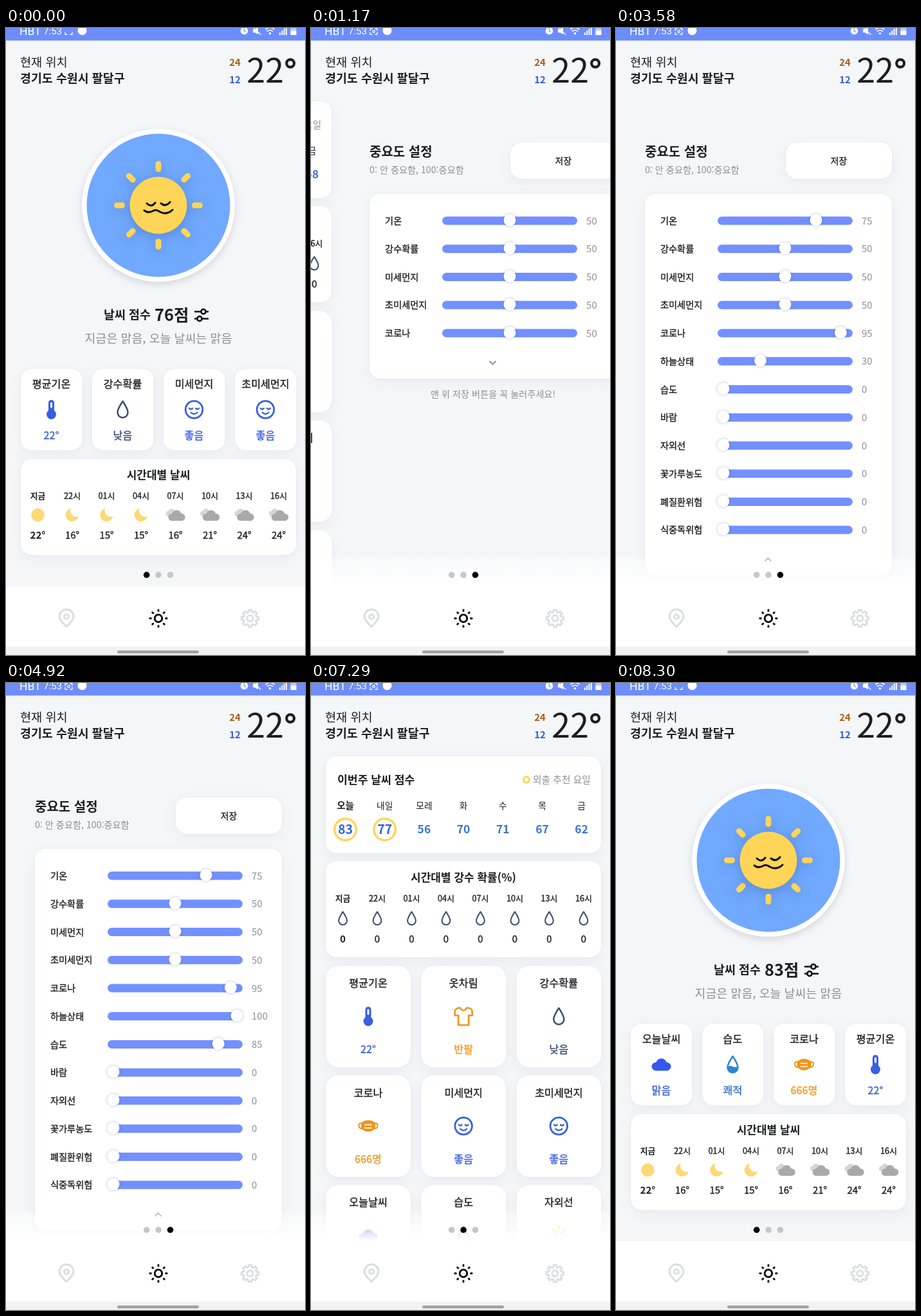
An HTML page that plays this animation: 465x976 px, repeating every 8.37 s.

```html
<!DOCTYPE html>
<html lang="ko">
<head>
<meta charset="utf-8">
<title>날씨</title>
<style>
html, body { margin: 0; width: 100%; height: 100%; overflow: hidden; background: #f5f6f8; }
svg { display: block; width: 465px; height: 976px; }
text { font-family: "Noto Sans CJK KR", "Noto Sans KR", "Noto Sans CJK JP", "Noto Sans CJK", sans-serif; color: #1d1e24; fill: currentColor; white-space: pre; }
.c { text-anchor: middle; }
.m { font-weight: 500; stroke: currentColor; stroke-width: .35px; }
.b { font-weight: 700; }
.status text { font-family: Roboto, sans-serif; color: #fff; }
.card { fill: #fff; filter: drop-shadow(0 0 1px rgba(60,75,130,.08)) drop-shadow(0 5px 9px rgba(60,75,130,.06)); }
.soft { filter: drop-shadow(0 4px 6px rgba(40,50,90,.16)); }
.glow { filter: drop-shadow(0 4px 9px rgba(30,60,130,.32)); }
.knob { fill: #fff; filter: drop-shadow(0 0 2px rgba(30,40,90,.3)); }
.line { fill: none; stroke-linecap: round; stroke-linejoin: round; }
</style>
</head>
<body>
<svg id="stage" viewBox="0 0 465 976" xmlns="http://www.w3.org/2000/svg"></svg>
<script>
const LOOP = 8370, EXPAND = 2500, SAVE = 6220;
const BLUE = '#385fe0', NAVY = '#3c4c6c', ORANGE = '#f0961c', GRAY = '#8e8f94',
      YELLOW = '#ffd557', BAR = '#7390ff', SCORE = '#3a74cc', PALE = '#dcdde0';

// Drawing helpers
const text = (x, y, size, str, cls = '', color = '') =>
  `<text x="${x}" y="${y}" font-size="${size}" class="${cls}"${color && ` style="color:${color}"`}>${str}</text>`;
const rect = (x, y, w, h, r, fill, more = '') =>
  `<rect x="${x}" y="${y}" width="${w}" height="${h}" rx="${r}" fill="${fill}" ${more}/>`;
const circle = (x, y, r, fill, more = '') => `<circle cx="${x}" cy="${y}" r="${r}" fill="${fill}" ${more}/>`;
const ring = (x, y, r, color, w) => circle(x, y, r, 'none', `stroke="${color}" stroke-width="${w}"`);
const line = (d, color, w) => `<path class="line" d="${d}" stroke="${color}" stroke-width="${w}"/>`;
const shape = (d, fill) => `<path d="${d}" fill="${fill}"/>`;
const card = (x, y, w, h, r = 17) => rect(x, y, w, h, r, '#fff', 'class="card"');
const at = (x, y, inner, scale = 1) => `<g transform="translate(${x} ${y}) scale(${scale})">${inner}</g>`;
const group = (id, inner) => `<g id="${id}">${inner}</g>`;
const each = (n, fn) => Array.from({ length: n }, (_, i) => fn(i)).join('');
const rays = (n, from, to, color, w) => each(n, i =>
  `<g transform="rotate(${i * 360 / n})">${line(`M0 ${-from}V${-to}`, color, w)}</g>`);

// Icons, centred on 0,0
const DROP = 'M0-13C4-7 8-1 8 4.4A8 8 0 0 1-8 4.4C-8-1-4-7 0-13Z';
const cloud = color => circle(-8.5, 3, 6.5, color) + circle(0, -1, 8.5, color) +
  circle(8.5, 3, 6.5, color) + rect(-8.5, 2, 17, 7.5, 0, color);
const icons = {
  thermo: rect(-4.5, -15, 9, 23, 4.5, BLUE) + circle(0, 7.5, 7.5, BLUE) + rect(-1.5, -11.5, 3, 9, 1.5, '#fff'),
  drop: line(DROP, NAVY, 2.5),
  humid: shape('M-7.5 3Q-4 1 0 3T7.5 3L8 5A8 8 0 0 1-8 5Z', '#2f84cf') + line(DROP, '#2f84cf', 2.5),
  smile: ring(0, 0, 13.3, BLUE, 2.8) + line('M-7.5-2Q-5 1-2.5-2M2.5-2Q5 1 7.5-2M-5 4.5Q0 9 5 4.5', BLUE, 2.3),
  shirt: line('M-5.5-13.5L-10-12.5Q-13.5-11-13.5-7V-1.5H-8V13.5H8V-1.5H13.5V-7Q13.5-11 10-12.5L5.5-13.5Q0-5-5.5-13.5Z', ORANGE, 2.7),
  mask: shape('M-11-5Q0-13 11-5V4Q0 14-11 4Z', ORANGE) +
    line('M-11-4C-17-5-15 3-11 4M11-4C17-5 15 3 11 4', ORANGE, 2) + line('M-5-2H5M-5 3H5', '#fff', 1.7),
  cloud: cloud('#3559ee'),
  uv: ring(0, 0, 6, YELLOW, 2.5) + rays(8, 10.5, 14, YELLOW, 2.5)
};
const sky = {
  sun: circle(0, 0, 10.3, '#fcd975'),
  moon: shape('M-2-10A10.2 10.2 0 1 0 10 2A9 9 0 0 1-2-10Z', '#fcd975'),
  cloud: at(-6, -4, cloud('#d6d6d6'), .6) + at(2, .8, cloud('#a9a9a9'), .88)
};

const items = {
  temp: ['평균기온', 'thermo', '22°', BLUE],
  rain: ['강수확률', 'drop', '낮음', NAVY],
  dust: ['미세먼지', 'smile', '좋음', BLUE],
  fine: ['초미세먼지', 'smile', '좋음', BLUE],
  wear: ['옷차림', 'shirt', '반팔', ORANGE],
  covid: ['코로나', 'mask', '666명', ORANGE],
  today: ['오늘날씨', 'cloud', '맑음', BLUE],
  humid: ['습도', 'humid', '쾌적', '#2f6fc9'],
  uv: ['자외선', 'uv', '보통', ORANGE]
};
function item(key, x, y, iconY, valueY) {
  const [name, icon, value, color] = items[key];
  return text(x, y, 16.2, name, 'c m') + at(x, iconY, icons[icon]) + text(x, valueY, 16.2, value, 'c m', color);
}

const hours = ['지금', '22시', '01시', '04시', '07시', '10시', '13시', '16시'];
const hourly = (y, cell) => hours.map((h, i) => {
  const x = 49.5 + 53.5 * i, cls = i ? 'c m' : 'c b';
  return text(x, y, 12.8, h, cls) + cell(x, i, cls);
}).join('');

// Page 1: current weather
const summary = (score, keys) => text(231, 456, 25.4, score + '점', 'b') +
  keys.map((k, i) => item(k, 70.5 + 111 * i, 560, 594, 640)).join('');
const temps = [22, 16, 15, 15, 16, 21, 24, 24];
const nowPage =
  circle(237, 276, 119, '#fff', 'class="soft"') + circle(237, 276, 111.5, '#70a9ff') +
  at(237, 276, `<g class="glow">${rays(8, 56.5, 64.5, YELLOW, 9)}${circle(0, 0, 44.5, YELLOW)}</g>` +
    line('M-18-3Q-11 4-5-4M4-3Q11 3 18-5M-22 8Q-16 13-8 8.5Q-3 6 2 10Q13 16 22 7', '#111', 3)) +
  text(152, 453, 18.4, '날씨 점수', 'b') +
  line('M294 441.5H303M311 441.5H314M294 452.5H297M305 452.5H314', '#111', 2.6) +
  ring(307, 441.5, 3.6, '#111', 2.6) + ring(301, 452.5, 3.6, '#111', 2.6) +
  text(237, 490, 18.4, '지금은 맑음, 오늘 날씨는 맑음', 'c', GRAY) +
  each(4, i => card(23 + 111 * i, 530.5, 95.5, 127)) +
  group('sumOld', summary(76, ['temp', 'rain', 'dust', 'fine'])) +
  group('sumNew', summary(83, ['today', 'humid', 'covid', 'temp'])) +
  card(23, 671, 428, 149.5) + text(237, 702, 17, '시간대별 날씨', 'c b') +
  hourly(733, (x, i, cls) => at(x, 758, i ? i < 4 ? sky.moon : sky.cloud : sky.sun) +
    text(x, 794.5, 15, temps[i] + '°', cls));

// Page 2: weekly scores and details
const weekX = i => 53.5 + 61.2 * i;
const scores = (list, good) => list.map((v, i) => i < good
  ? ring(weekX(i), 228, 16.8, YELLOW, 3.5) + text(weekX(i), 235, 19.5, v, 'c b', BLUE)
  : text(weekX(i), 234, 17.5, v, 'c b', SCORE)).join('');
const grid = ['temp', 'wear', 'rain', 'covid', 'dust', 'fine', 'today', 'humid', 'uv'];
const weekPage =
  card(23, 114, 428, 151) + text(41, 157, 17.2, '이번주 날씨 점수', 'b') +
  ring(335, 150.5, 4.5, YELLOW, 3) + text(345, 156, 14.8, '외출 추천 요일', '', GRAY) +
  ['오늘', '내일', '모레', '화', '수', '목', '금'].map((d, i) =>
    text(weekX(i), 196, i ? 13.8 : 14.5, d, i ? 'c' : 'c b')).join('') +
  group('weekOld', scores([76, 76, 70, 70, 76, 64, 58], 5)) +
  group('weekNew', scores([83, 77, 56, 70, 71, 67, 62], 2)) +
  card(23, 277, 428, 150) + text(237, 309, 17, '시간대별 강수 확률(%)', 'c b') +
  hourly(340, (x, i, cls) => at(x, 366.5, icons.drop, .8) + text(x, 404, 15, '0', cls)) +
  grid.map((k, i) => {
    const col = i % 3, y = 440 + 170.6 * Math.floor(i / 3);
    return card(23 + 148.3 * col, y, 132, 158.5, 20) + item(k, 89 + 148.2 * col, y + 33, y + 79, y + 136);
  }).join('');

// Page 3: sliders. Each drag is [start, end, value].
const rows = [
  ['기온', 50, [1620, 2200, 75]],
  ['강수확률', 50], ['미세먼지', 50], ['초미세먼지', 50],
  ['코로나', 50, [2720, 3180, 95], [5010, 5260, 80]],
  ['하늘상태', 0, [3400, 3850, 100]],
  ['습도', 0, [4010, 4700, 85], [5320, 5660, 100]],
  ['바람', 0], ['자외선', 0], ['꽃가루농도', 0], ['폐질환위험', 0], ['식중독위험', 0]
];
const setPage =
  text(45, 200, 20, '중요도 설정', 'b') +
  text(45, 226, 14.2, '0: 안 중요함, 100:중요함', '', GRAY) +
  card(264, 178, 165, 57, 18) + text(346.5, 211.5, 13.8, '저장', 'c m') +
  rect(45, 258, 384, 288, 17, '#fff', 'class="card" id="panel"') +
  rows.map(([name], i) => group('row' + i,
    text(69, 5, 14.2, name, 'm') + rect(158, -6.5, 210, 13, 6.5, BAR) +
    circle(0, -1, 9.5, '#fff', 'class="knob"') + text(382, 5.5, 15, '', '', GRAY))).join('') +
  group('chevron', line('M-4.5-2L0 2.5L4.5-2', GRAY, 1.8)) +
  group('hint', text(237, 0, 14.2, '맨 위 저장 버튼을 꼭 눌러주세요!', 'c', GRAY));

const gear = 'M' + each(8, i => [[-.27, 10.2], [-.17, 13.4], [.17, 13.4], [.27, 10.2]].map(([a, r]) => {
  const angle = i * Math.PI / 4 + a;
  return `${(r * Math.sin(angle)).toFixed(1)} ${(-r * Math.cos(angle)).toFixed(1)} `;
}).join('')) + 'Z';

const status = '<g class="status">' + rect(0, 0, 465, 19.5, 0, '#6c8dfb') +
  text(21, 11, 17.5, 'HBT') + text(58, 10, 15, '7:53') +
  line('M92 7V10H95M100 10H103V7', '#fff', 1.3) +
  group('rec', line('M92 4V1H95M100 1H103V4', '#fff', 1.3) + ring(97.5, 5.5, 1.8, '#fff', 1.2)) +
  circle(118.5, 4, 7, '#fff') +
  circle(370.5, 4.5, 5.8, '#fff') + line('M370.5 1V5L373 6', '#6c8dfb', 1.3) +
  shape('M384 2H387L392-2V10L387 7H384Z', '#fff') + line('M384-1L396 10', '#fff', 1.4) +
  line('M404 2Q410.5-3 417 2M406.5 5Q410.5 2 414.5 5', '#fff', 1.6) + circle(410.5, 8.5, 1.8, '#fff') +
  each(4, i => rect(425 + 3.3 * i, 7 - 3 * i, 2, 4 + 3 * i, .5, '#fff')) +
  rect(442.5, -3, 9, 14, 1.5, '#fff', 'opacity=".55"') + rect(442.5, 4, 9, 7, 1, '#fff') + '</g>';

const header = text(22, 60, 18.6, '현재 위치') + text(22, 85, 18.4, '경기도 수원시 팔달구', 'b') +
  text(356, 58.5, 15, '24', 'c b', '#a5601c') + text(356, 86, 15, '12', 'c b', BLUE) +
  text(374.3, 85, 52, '22') + ring(442.2, 55, 5.9, '#1d1e24', 4.2);

const nav = rect(0, 869, 465, 95, 0, '#fff') +
  at(94, 919, line('M0 13C-6 7-11 2-11-3A11 11 0 0 1 11-3C11 2 6 7 0 13Z', PALE, 2.8) + ring(0, -2.5, 3.6, PALE, 2.8)) +
  at(237, 919, ring(0, 0, 5.8, '#000', 2.8) + rays(8, 11.6, 13.2, '#000', 2.8)) +
  at(379.5, 919, line(gear, PALE, 2.8) + ring(0, 0, 4.6, PALE, 2.8)) +
  rect(0, 963, 465, 13, 0, '#f2f2f2') + rect(173, 969, 127, 4.6, 2.3, '#a2a2a2');

document.getElementById('stage').innerHTML =
  `<defs><linearGradient id="fog" x2="0" y2="1"><stop stop-color="#fff" stop-opacity=".35"/>
   <stop offset=".95" stop-color="#fff"/></linearGradient></defs>` +
  rect(0, 0, 465, 976, 0, '#f5f6f8') +
  group('page0', nowPage) + group('page1', weekPage) + group('page2', setPage) +
  header + rect(0, 824, 465, 46, 0, 'url(#fog)', 'id="fade"') + nav +
  each(3, i => circle(218.7 + 18.4 * i, 851.3, 4.8, '#c6c6cb', `id="dot${i}"`)) +
  group('toast', rect(165, 720, 143, 34, 17, '#bcbdbe') +
    text(236.5, 740.8, 11.4, '선호도를 저장했습니다', 'c', '#fafafa')) + status;

const el = id => document.getElementById(id);
const show = (id, on) => { el(id).style.display = on ? '' : 'none'; };
const move = (id, x, y) => el(id).setAttribute('transform', `translate(${x} ${y})`);
const ramp = (t, a, b) => Math.min(1, Math.max(0, (t - a) / (b - a)));
const ease = k => k < .5 ? 2 * k * k : 1 - 2 * (1 - k) * (1 - k);
const glide = (t, a, b) => ease(ramp(t, a, b));

function valueAt([, start, ...drags], t) {
  const v = drags.reduce((from, [a, b, to]) => from + (to - from) * glide(t, a, b), start);
  return Math.round(v / 5) * 5;
}

function drawList(t) {
  const saved = t >= SAVE, open = t >= EXPAND && !saved;
  const values = rows.map(r => valueAt(r, t));
  const order = rows.map((_, i) => i);
  if (saved) order.sort((a, b) => values[b] - values[a] || a - b);
  const count = open ? rows.length : saved ? 7 : 5;
  const height = 69 + 43.8 * count, bottom = 258 + height;
  el('panel').setAttribute('height', height);
  order.forEach((r, i) => {
    show('row' + r, i < count);
    move('row' + r, 0, 300 + 43.75 * i);
    el('row' + r).querySelector('.knob').setAttribute('cx', 167 + 1.92 * values[r]);
    el('row' + r).lastChild.textContent = values[r];
  });
  el('chevron').setAttribute('transform', `translate(236.5 ${bottom - 25}) scale(1 ${open ? -1 : 1})`);
  move('hint', 0, bottom + 28.5);
}

function draw(t) {
  const pos = glide(t, 260, 570) + glide(t, 930, 1240) - glide(t, 7010, 7285) - glide(t, 7390, 7780);
  const saved = t >= SAVE;
  for (let i = 0; i < 3; i++) {
    show('page' + i, Math.abs(i - pos) < 1);
    move('page' + i, (i - pos) * 465, 0);
    el('dot' + i).setAttribute('fill', Math.round(pos) === i ? '#000' : '#c6c6cb');
  }
  el('fade').style.opacity = Math.min(1, pos);
  for (const part of ['sum', 'week']) {
    show(part + 'Old', !saved);
    show(part + 'New', saved);
  }
  show('rec', t > 970 && t < 7800);
  el('toast').style.opacity = ramp(t, 6290, 6480) - ramp(t, 7000, 7180);
  drawList(t);
}

const start = performance.now();
function tick() {
  draw((performance.now() - start) % LOOP);
  requestAnimationFrame(tick);
}
tick();
</script>
</body>
</html>
```
